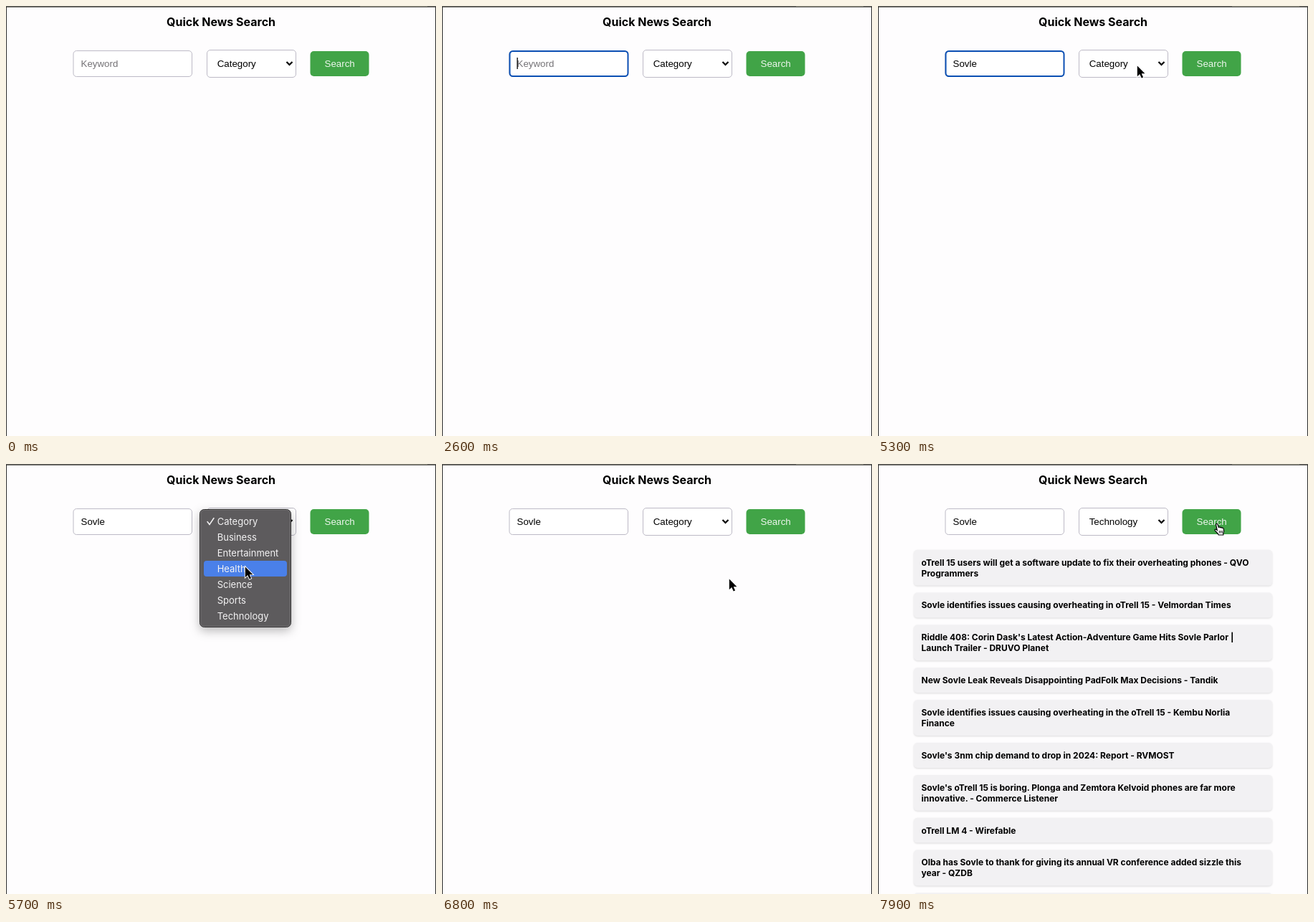
An HTML page for the animation above (8000 ms loop, 600x600 px).

```html
<!DOCTYPE html>
<html lang="en">
<head>
<title>Quick News Search</title>
<style>
  html, body { margin: 0; width: 100%; height: 100%; overflow: hidden; background: #fefdfe; }
  svg { display: block; width: 600px; height: 600px; }
  text { white-space: pre; }
  .title { font: 700 16px Inter, sans-serif; text-anchor: middle; }
  .form { font: 13.333px "Liberation Sans", Arial, sans-serif; }
  .field { fill: #fff; stroke: #bdbac6; }
  .option { font: 400 13px Inter, sans-serif; fill: #f4f3f4; }
  .news { font: 700 12px Inter, sans-serif; }
  .card { fill: #f2f1f3; filter: drop-shadow(0 1px 1.2px rgba(0, 0, 0, .13)); }
  .panel { fill: #5d5b5d; stroke: #2b2a2b; filter: drop-shadow(0 5px 7px rgba(0, 0, 0, .27)); }
</style>
</head>
<body>
<svg viewBox="0 0 600 600">
  <rect width="600" height="600" fill="#fefdfe"/>
  <text class="title" x="300" y="28">Quick News Search</text>

  <g class="form">
    <rect class="field" x="94" y="62.5" width="165.5" height="36" rx="4.5"/>
    <rect id="ring" x="94.5" y="63" width="165" height="35" rx="4.5" fill="none" stroke="#0b4fb3" stroke-width="2"/>
    <text id="hint" x="104.5" y="85" fill="#757377">Keyword</text>
    <text id="typed" x="104.5" y="85"></text>
    <rect id="caret" y="72" width="1.3" height="16"/>
    <rect class="field" x="280.5" y="61.5" width="124" height="38" rx="4.5"/>
    <text id="choice" x="294.7" y="85">Category</text>
    <path d="M391.5 78l4 4 4-4" fill="none" stroke="#000" stroke-width="2.2"/>
    <rect x="424.5" y="63" width="82" height="35" rx="5" fill="#41a447"/>
    <text x="444.5" y="85" fill="#eef6ee">Search</text>
  </g>

  <g id="results"></g>

  <g id="menu">
    <rect class="panel" x="270.5" y="63.5" width="127" height="164" rx="6"/>
    <rect x="271.5" y="64.5" width="125" height="162" rx="5" fill="none" stroke="#747274"/>
    <rect id="highlight" x="276" width="116" height="22" rx="4" fill="#4a80e9"/>
    <path d="M281 80.5l3 4 6-9" fill="none" stroke="#f4f3f4" stroke-width="1.5" stroke-linecap="round"/>
  </g>

  <path d="M0 1H600" stroke="#2c2d26" stroke-width="1.4"/>
  <path d="M494 .3H588" stroke="#b9b7a0" stroke-width=".6"/>
  <path d="M.5 1V600M599.5 1V600" stroke="#2c2d2c"/>

  <g id="arrow" class="pointer">
    <path d="M.8 .5V15.2L4.2 12 6.7 17.6 9.1 16.6 6.7 11.2H11.4Z" stroke="#fff" paint-order="stroke" stroke-width="1.8"/>
  </g>
  <g id="beam" class="pointer">
    <path d="M-3-8.5Q0-8.5 0-6Q0-8.5 3-8.5M0-6V6M-3 8.5Q0 8.5 0 6Q0 8.5 3 8.5M-1.5 3H1.5" fill="none" stroke="#222" stroke-width="1.1"/>
  </g>
  <g id="hand" class="pointer">
    <path d="M1.5 2.2C2 .8 3.6 1 4 2.3L5.3 6.4C6 5.6 7.3 5.7 7.7 6.7 8.5 6 9.7 6.3 10 7.3 11 6.8 12 7.3 12.3 8.5 12.8 11 13 12.5 11.8 14.5V17H5.3C4.5 15 2 13 .2 10.8-.6 9.5.8 8.6 2 9.4L3.2 10.4Z" fill="#fff" stroke="#000" stroke-width="1.2"/>
    <path d="M6.3 11v3.5M8.3 11v3.5M10.3 11v3.5" stroke="#000" stroke-width=".9"/>
  </g>
</svg>

<script>
const LOOP = 8000, STEP = 100;
const WORD = "Sovle";
const TYPE_TIMES = [2700, 3100, 3300, 3400, 3700];
const CARET_ON = [[800, 1300], [1800, 2300], [2600, 4200], [4700, 5200]];
const CATEGORIES = ["Category", "Business", "Entertainment", "Health", "Science", "Sports", "Technology"];
const HEADLINES = [
  ["oTrell 15 users will get a software update to fix their overheating phones - QVO", "Programmers"],
  ["Sovle identifies issues causing overheating in oTrell 15 - Velmordan Times"],
  ["Riddle 408: Corin Dask's Latest Action-Adventure Game Hits Sovle Parlor |", "Launch Trailer - DRUVO Planet"],
  ["New Sovle Leak Reveals Disappointing PadFolk Max Decisions - Tandik"],
  ["Sovle identifies issues causing overheating in the oTrell 15 - Kembu Norlia", "Finance"],
  ["Sovle's 3nm chip demand to drop in 2024: Report - RVMOST"],
  ["Sovle's oTrell 15 is boring. Plonga and Zemtora Kelvoid phones are far more", "innovative. - Commerce Listener"],
  ["oTrell LM 4 - Wirefable"],
  ["Olba has Sovle to thank for giving its annual VR conference added sizzle this", "year - QZDB"],
  [""]
];

// Pointer strokes: shape, then [time, x, y] stops; the last stop holds until the end time.
const STROKES = [
  { shape: "arrow", end: 400, path: [[100, 75, 477]] },
  { shape: "arrow", end: 800, path: [[400, 128, 313], [500, 128, 313], [600, 122, 235], [700, 110, 130]] },
  { shape: "beam", end: 2200, path: [[800, 108, 92], [1400, 102, 86]] },
  { shape: "beam", end: 4600, path: [[4500, 130, 82]] },
  { shape: "arrow", end: 6800, path: [
    [4600, 200, 55], [4700, 272, 46], [4800, 345, 68], [4900, 374, 84], [5100, 374, 84],
    [5300, 361, 83], [5400, 358, 85], [5500, 348, 98], [5700, 333, 143], [6000, 333, 166],
    [6300, 332, 209], [6700, 332, 209]] },
  { shape: "arrow", end: 7000, path: [[6800, 400, 160], [6900, 452, 105]] },
  { shape: "hand", end: LOOP, path: [[7000, 468, 84], [7500, 468, 84], [7700, 470, 82]] }
];

const $ = id => document.getElementById(id);
const pointers = document.querySelectorAll(".pointer");
const within = (t, from, to) => t >= from && t < to;
const show = (el, on) => { el.style.display = on ? "" : "none"; };

function add(parent, tag, attrs, text = "") {
  const el = document.createElementNS("http://www.w3.org/2000/svg", tag);
  for (const key in attrs) el.setAttribute(key, attrs[key]);
  el.textContent = text;
  parent.append(el);
}

CATEGORIES.forEach((name, i) =>
  add($("menu"), "text", { class: "option", x: 294.7, y: 84.8 + i * 22 }, name));

let cardTop = 119.8;
for (const lines of HEADLINES) {
  const height = 20 + 14.9 * lines.length;
  add($("results"), "rect", { class: "card", x: 50, y: cardTop, width: 500, height, rx: 5 });
  lines.forEach((line, i) =>
    add($("results"), "text", { class: "news", x: 60.5, y: cardTop + 21.8 + i * 14.9 }, line));
  cardTop += height + 10;
}

function locate(path, t) {
  const next = path.findIndex(stop => stop[0] > t);
  if (next < 0) return path[path.length - 1].slice(1);
  const [t0, x0, y0] = path[next - 1], [t1, x1, y1] = path[next];
  const k = (t - t0) / (t1 - t0);
  return [x0 + (x1 - x0) * k, y0 + (y1 - y0) * k];
}

function draw(t) {
  const typed = WORD.slice(0, TYPE_TIMES.filter(time => time <= t).length);
  $("typed").textContent = typed;
  show($("hint"), !typed);
  show($("ring"), within(t, 800, 5500));
  $("caret").setAttribute("x", 104.5 + (typed ? $("typed").getComputedTextLength() : 0));
  show($("caret"), CARET_ON.some(span => within(t, ...span)));

  const stroke = STROKES.find(s => within(t, s.path[0][0], s.end));
  pointers.forEach(el => show(el, stroke && el.id === stroke.shape));
  if (stroke) {
    const [x, y] = locate(stroke.path, t);
    $(stroke.shape).setAttribute("transform", `translate(${x} ${y})`);
    const row = Math.max(0, Math.min(6, Math.floor((y - 69) / 22)));
    $("highlight").setAttribute("y", 69 + row * 22);
  }
  show($("menu"), within(t, 5500, 6800));
  show($("highlight"), t < 6700);
  $("choice").textContent = CATEGORIES[t < 7100 ? 0 : 6];
  show($("results"), t >= 7700);
}

const start = performance.now();
function tick() {
  const t = (performance.now() - start) % LOOP;
  draw(Math.floor(t / STEP) * STEP);
  requestAnimationFrame(tick);
}
tick();
</script>
</body>
</html>
```
